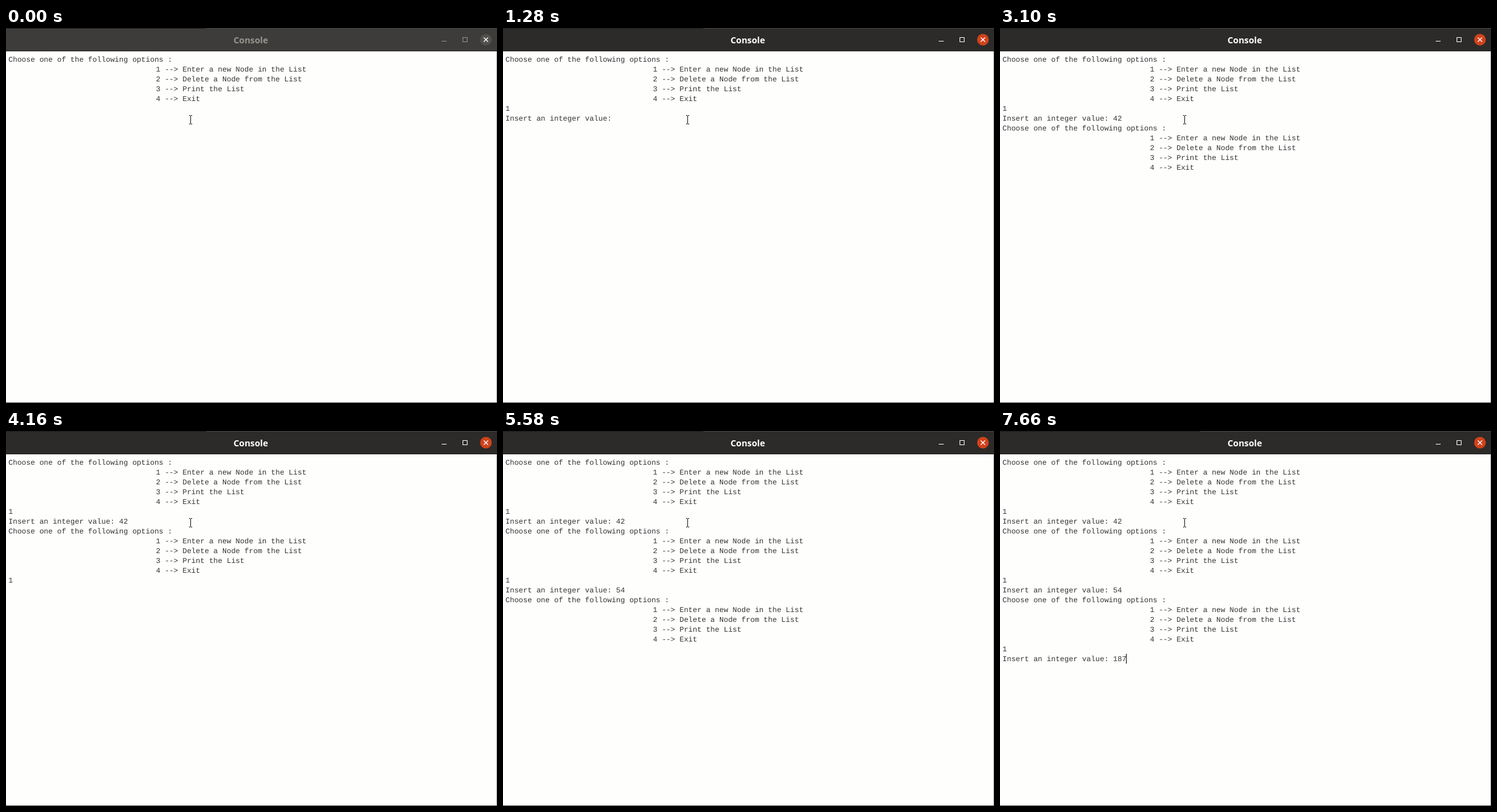
An HTML page for the animation above (8 s loop, 799x611 px).

```html
<!DOCTYPE html>
<html lang="en">
<head>
<meta charset="utf-8">
<title>Console</title>
<style>
html, body { margin: 0; width: 100%; height: 100%; overflow: hidden; background: #fefefd; }
svg, pre, #caret { position: absolute; }
svg { left: 0; top: 0; }
.title { font: bold 14.3px "Open Sans", "Noto Sans", sans-serif; text-anchor: middle; }
pre {
  left: 4px; top: 44px; margin: 0; tab-size: 240px; color: #333;
  font: 12px/16px "Liberation Mono", monospace; text-rendering: geometricPrecision;
}
#caret { width: 1px; height: 16px; background: #000; }
#bar { --bar: #2c2b29; --ink: #fff; --close: #d0421b; }
#bar.idle { --bar: #3d3c3a; --ink: #96958f; --close: #51504d; }
</style>
</head>
<body>
<svg id="bar" width="799" height="611">
  <rect width="799" height="39" fill="var(--bar)"/>
  <rect width="799" height="1" fill="#464644"/>
  <rect width="326" height="1" fill="#1d1d1c"/>
  <rect y="37" width="799" height="1" fill="#21201e"/>
  <rect y="38" width="799" height="573" fill="#fefefd"/>
  <rect x="798" y="38" width="1" height="573" fill="#aaa"/>
  <rect y="610" width="799" height="1" fill="#4a4a48"/>
  <text class="title" x="398.3" y="25" fill="var(--ink)">Console</text>
  <rect x="709" y="21" width="8" height="1" fill="var(--ink)"/>
  <rect x="743.5" y="15.5" width="7" height="7" fill="none" stroke="var(--ink)"/>
  <circle cx="781" cy="19" r="9.5" fill="var(--close)"/>
  <path d="M777.5 15.5l7 7m0-7l-7 7" stroke="#fff" stroke-width="1.4"/>
  <path d="M298 142.5h2m1 0h2M300.5 143v13M298 156.5h2m1 0h2" stroke="#111" fill="none"/>
</svg>
<pre id="screen"></pre>
<div id="caret"></div>
<script>
const LOOP = 8000, CHAR = 7.2, ROW = 16;
const MENU = `Choose one of the following options :
\t1 --> Enter a new Node in the List
\t2 --> Delete a Node from the List
\t3 --> Print the List
\t4 --> Exit
`;
const ASK = "\nInsert an integer value: ";

// [time, output or key ("\b" erases), caret visible]
const events = [
  [0, MENU, 0], [500, "", 1], [880, "1", 1], [1000, "", 0],
  [1280, ASK, 0], [1540, "", 1], [2060, "", 0], [2580, "", 1],
  [2800, "4", 1], [2860, "2", 1],
  [2940, "\n" + MENU, 1], [3100, "", 0], [3620, "1", 1], [4160, "", 0],
  [4300, ASK, 0], [4660, "", 1], [5160, "5", 0], [5240, "4", 0],
  [5580, "\n" + MENU, 0], [5660, "1", 1], [6140, "\b", 1], [6160, "1", 1], [6660, "", 0],
  [6720, ASK, 1], [7160, "", 0], [7340, "1", 0], [7380, "8", 0], [7540, "7", 0], [7660, "", 1]
];

const $ = id => document.getElementById(id);
const bar = $("bar"), screenText = $("screen"), caret = $("caret");

function draw(t) {
  let text = "", shown = 0;
  for (const [time, add, on] of events) {
    if (time > t) break;
    text = add === "\b" ? text.slice(0, -1) : text + add;
    shown = on;
  }
  const lines = text.split("\n");
  screenText.textContent = text;
  caret.style.left = Math.floor(4 + lines.at(-1).length * CHAR) + "px";
  caret.style.top = 43 + (lines.length - 1) * ROW + "px";
  caret.hidden = !shown;
  bar.classList.toggle("idle", t < 500);
}

const start = performance.now();
function tick() {
  draw((performance.now() - start) % LOOP);
  requestAnimationFrame(tick);
}
tick();
</script>
</body>
</html>
```
